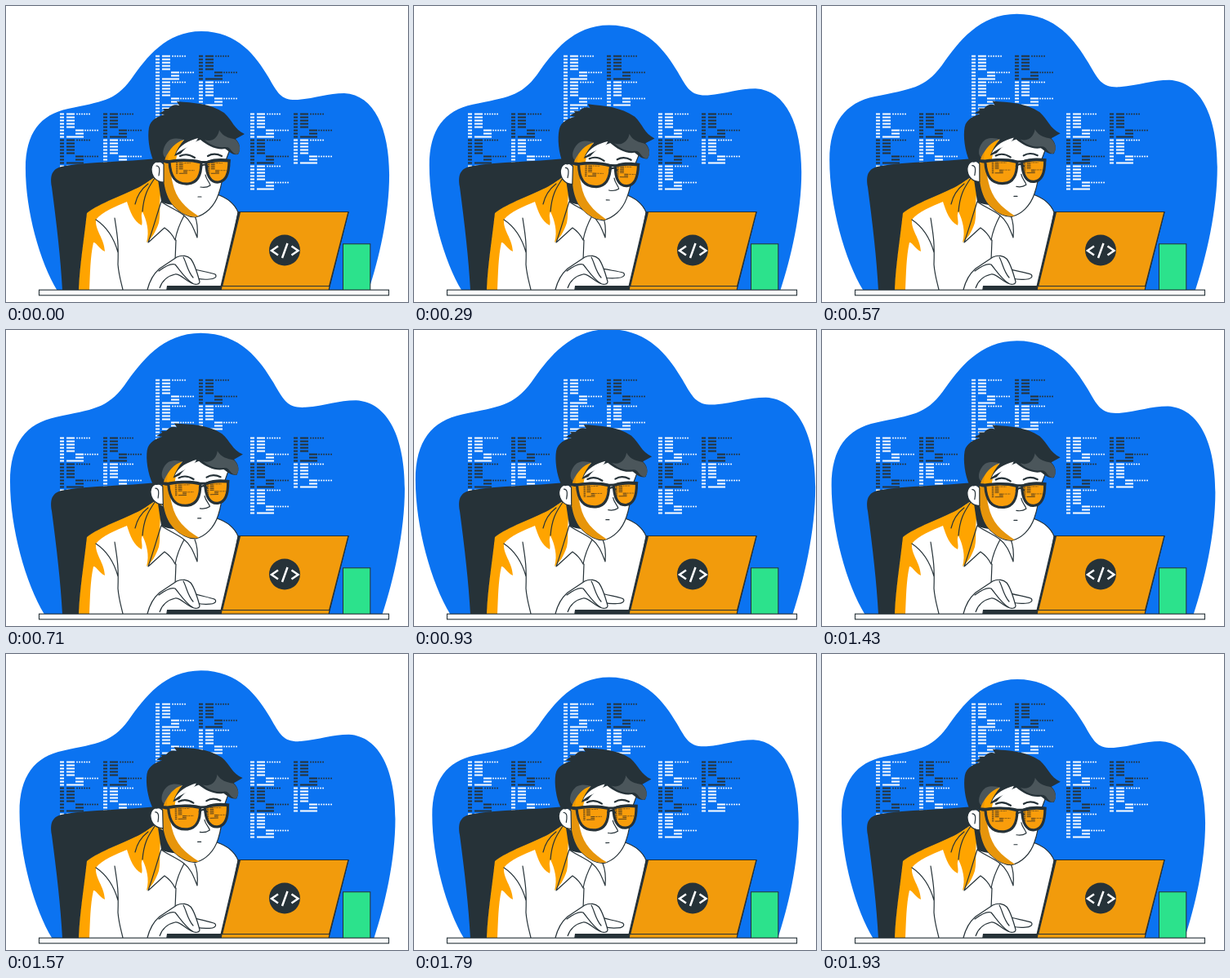
Write an HTML page that moves like this. It is 492x363 px and loops after 2 s.

```html
<!DOCTYPE html>
<html lang="en">
<head>
<meta charset="utf-8">
<title>Programmer at a laptop</title>
<style>
  html, body { margin: 0; width: 100%; height: 100%; overflow: hidden; background: #fff; }
  svg { display: block; width: 100vw; height: 100vh; }
  .line { fill: none; stroke: #263238; stroke-width: 1.2; stroke-linecap: round; stroke-linejoin: round; }
  .brow { stroke-width: 2.2; }
  .white { fill: #fff; stroke: #263238; stroke-width: 1.2; stroke-linejoin: round; }
  .dark { fill: #263238; }
  .grey { fill: #4b565b; }
  .sun { fill: #ffa400; }
  .shade { fill: #e7950b; }
</style>
</head>
<body>
<svg viewBox="0 0 492 363" xmlns="http://www.w3.org/2000/svg">
  <defs>
    <g id="code" fill="none" stroke="currentColor" stroke-width="1.9">
      <path d="M0 1.5H5M0 5.5H5M0 9.5H5M0 13.5H5M0 17.5H5M0 21.5H5M0 25.5H5M0 29.5H5"/>
      <path d="M8 1.5H18M8 5.5H18M8 9.5H18M8 13.5H18M8 17.5H18M19 21.5H29M19 25.5H29M8 29.5H29"/>
      <path d="M21 1.5H37M31 21.5H47" stroke-width="1.8" stroke-linecap="round" stroke-dasharray=".1 2.9"/>
    </g>
    <clipPath id="aboveDesk"><rect width="492" height="349"/></clipPath>
  </defs>

  <g clip-path="url(#aboveDesk)">
    <path id="blob" fill="#0b73f1" d="M64 351C42 316 24 252 24 199C24 156 42 133 76 126C117 117 133 117 153 90C172 63 196 31 239 31C284 31 306 62 321 87C333 108 337 116 357 115C380 113 394 107 414 107C451 109 469 151 469 207C469 257 456 312 443 351Z"/>
  </g>
  <g id="wall"></g>

  <!-- chair -->
  <path class="dark" d="M69 349C67 310 62 268 56 222C53 205 58 198 73 196C104 191 145 191 186 187L200 215L150 260L98 349Z"/>

  <!-- body -->
  <path class="white" d="M89 349C90 320 95 290 99 254C114 242 146 231 165 221C174 216 179 210 187 207L205 235L258 231C270 235 280 243 284 253L266 349Z"/>
  <path class="sun" d="M89 348.5C90 320 95 290 99 254C114 242 146 231 165 221C174 216 179 210 190 208L191 222C186 238 190 252 187 266C183 278 178 285 172 290C176 276 172 263 167 252C164 257 168 264 166 269C156 264 152 252 148 240C134 246 118 252 110 262C109 276 120 284 121 301C114 298 111 290 107 290C103 308 103 328 102 348.5Z"/>
  <path class="dark" d="M186 213L190 240C200 245 213 245 224 244L212 226Z"/>
  <path class="line" d="M110 262C122 270 132 284 137 302M133 260C136 280 138 288 137 317C138 330 141 339 143 348M182 211C176 221 169 228 167 252M174 218C165 225 160 234 158 243"/>
  <path class="line" d="M190 240C184 258 180 273 174 290C181 284 188 277 194 272C200 276 204 281 207 287C209 276 212 268 218 257C227 264 230 274 234 284C235 272 234 264 231 257M190 240C200 247 211 251 218 257M208 287L207 312"/>

  <!-- head -->
  <g id="head">
    <path class="white" d="M194 178C190 210 194 234 206 246C214 254 222 259 232 259C244 256 255 246 260 231C264 220 266 208 268 192L274 176L245 150L202 160Z"/>
    <path class="shade" d="M200 172L207 182C201 192 201 205 204 217C208 236 219 247 236 258C224 260 214 254 206 246C194 234 190 210 194 184Z"/>
    <path class="sun" d="M201 168L218 163C213 172 209 180 208 190L198 189Z"/>
    <path class="white" d="M193 194C188 188 179 190 178 200C178 209 184 216 193 216Z"/>
    <path class="line" d="M184 196C189 196 188 203 187 208"/>
    <path class="dark" d="M181 191C175 178 173 160 175 149C177 139 187 135 194 133L187 132L194 128L192 126L199 126C202 122 207 120 212 122L209 117C230 119 249 119 267 131C277 140 279 151 292 157L281 163C286 168 288 175 284 182C276 183 273 178 268 175C258 177 246 171 238 164C229 167 221 172 214 181L206 184C209 176 213 170 218 164C209 164 203 166 200 172C197 177 196 183 194 190L186 192Z"/>
    <path class="grey" d="M195 186C189 181 194 168 201 164C208 161 214 163 218 164C207 167 201 175 195 186ZM243 164C253 168 260 160 261 152C267 163 278 162 281 164C287 170 288 178 283 182C275 181 276 172 268 173C258 174 249 170 243 164Z"/>
    <path fill="#fff" d="M208 181C213 170 224 165 235 162C232 171 221 172 208 181Z"/>
    <path class="line brow" d="M213 184C219 181 225 182 231 186M247 184C252 181 258 181 264 184"/>
    <path class="line" d="M244 207C245 213 250 217 250 220C247 222 243 223 238 222M235 234H239"/>
    <path class="dark" d="M185 188L200 189C214 187 229 187 239 190H246C256 186 266 187 275 188L274 193H197L185 190Z"/>
    <g stroke="#263238" stroke-width="3.2" fill="#f99d0b" stroke-linejoin="round">
      <path d="M200 191C212 189 227 189 239 192C239 207 235 217 223 218C207 219 201 209 200 191Z"/>
      <path d="M245 192C254 189 264 189 273 190C273 203 270 215 260 216C250 217 245 207 245 192Z"/>
    </g>
    <path class="line brow" d="M238 197Q243 192 247 197"/>
    <g color="#4a3a20">
      <use href="#code" transform="translate(208 192) scale(.48 .45)"/>
      <use href="#code" transform="translate(247 192) scale(.48 .45)"/>
    </g>
  </g>

  <!-- hand -->
  <g id="finger">
    <path class="white" d="M224 321C236 325 248 326 256 329C259 332 255 335 249 335C239 336 230 334 222 330"/>
  </g>
  <path class="white" d="M173 348C176 336 181 328 188 322L209 308C215 305 222 306 226 310C231 316 234 327 237 338C237 342 231 342 228 340C220 337 213 328 207 329C198 331 191 337 188 346"/>
  <path class="line" d="M187 325C195 319 202 315 207 317C213 324 219 334 228 340M217 308C221 315 222 325 229 333"/>

  <!-- laptop -->
  <path class="dark" d="M197 343H266V349.5H196Z"/>
  <g fill="#f29b0c" stroke="#263238" stroke-width="1.2" stroke-linejoin="round">
    <path class="dark" d="M284.5 252.5H419L396 344H263Z"/>
    <path d="M286.5 252.5H419L395.5 344H264.5Z"/>
    <path d="M264 343.5H396L395 349.5H263Z"/>
  </g>
  <circle class="dark" cx="341" cy="299.5" r="19"/>
  <path d="M333 294.5L325 300L333 305.5M344.5 291L338 309M349.5 294.5L357.5 300L349.5 305.5" fill="none" stroke="#fff" stroke-width="2.5"/>

  <!-- cup and desk -->
  <rect x="412.5" y="291.8" width="33.3" height="57" fill="#2ce28c" stroke="#263238"/>
  <rect x="40.5" y="348.2" width="428" height="6.6" fill="#fff" stroke="#263238" stroke-width="1.1"/>
</svg>

<script>
  const byId = id => document.getElementById(id);
  const LOOP = 2000, STEPS = 28;
  const LEAD = 5; // ms, so that steps rounded down to 10 ms still count

  // Each cluster: x, y, then colours of the first and second column (w = white, d = dark)
  const clusters = [[66, 131, "wdw", "dw"], [183, 60, "www", "dw"], [299, 131, "wdw", "dw"]];
  let blocks = "";
  for (const [x, y, ...columns] of clusters)
    columns.forEach((tones, c) => [...tones].forEach((tone, r) => {
      blocks += `<use href="#code" x="${x + c * 53}" y="${y + r * 32}" color="${tone === "w" ? "#fff" : "#263238"}"/>`;
    }));
  byId("wall").innerHTML = blocks;

  // Step and angle of the nodding head
  const nod = [[0, 0], [4, 1.65], [8, -.25], [10.5, -1.6], [13, -.55], [17, 1.6], [22, -1.5], [24, -1.5], [27, -.1], [28, 0]];

  function sample(points, at) {
    const i = points.findIndex(p => p[0] > at);
    const [x0, y0] = points[i - 1], [x1, y1] = points[i];
    return y0 + (y1 - y0) * (at - x0) / (x1 - x0);
  }

  const turn = (id, angle, x, y) =>
    byId(id).setAttribute("transform", `rotate(${angle.toFixed(3)} ${x} ${y})`);

  const start = performance.now();
  function draw() {
    const time = (performance.now() - start + LEAD) % LOOP;
    const step = Math.floor(time / LOOP * STEPS);
    const phase = (step + .5) / STEPS * Math.PI * 2;
    const scale = 1.05 - .05 * Math.cos(phase);
    byId("blob").setAttribute("transform", `translate(246.5 351) scale(${scale}) translate(-246.5 -351)`);
    const angle = sample(nod, step);
    turn("head", angle, 100, 245);
    turn("finger", -angle * 1.2, 206, 318);
    requestAnimationFrame(draw);
  }
  draw();
</script>
</body>
</html>
```
